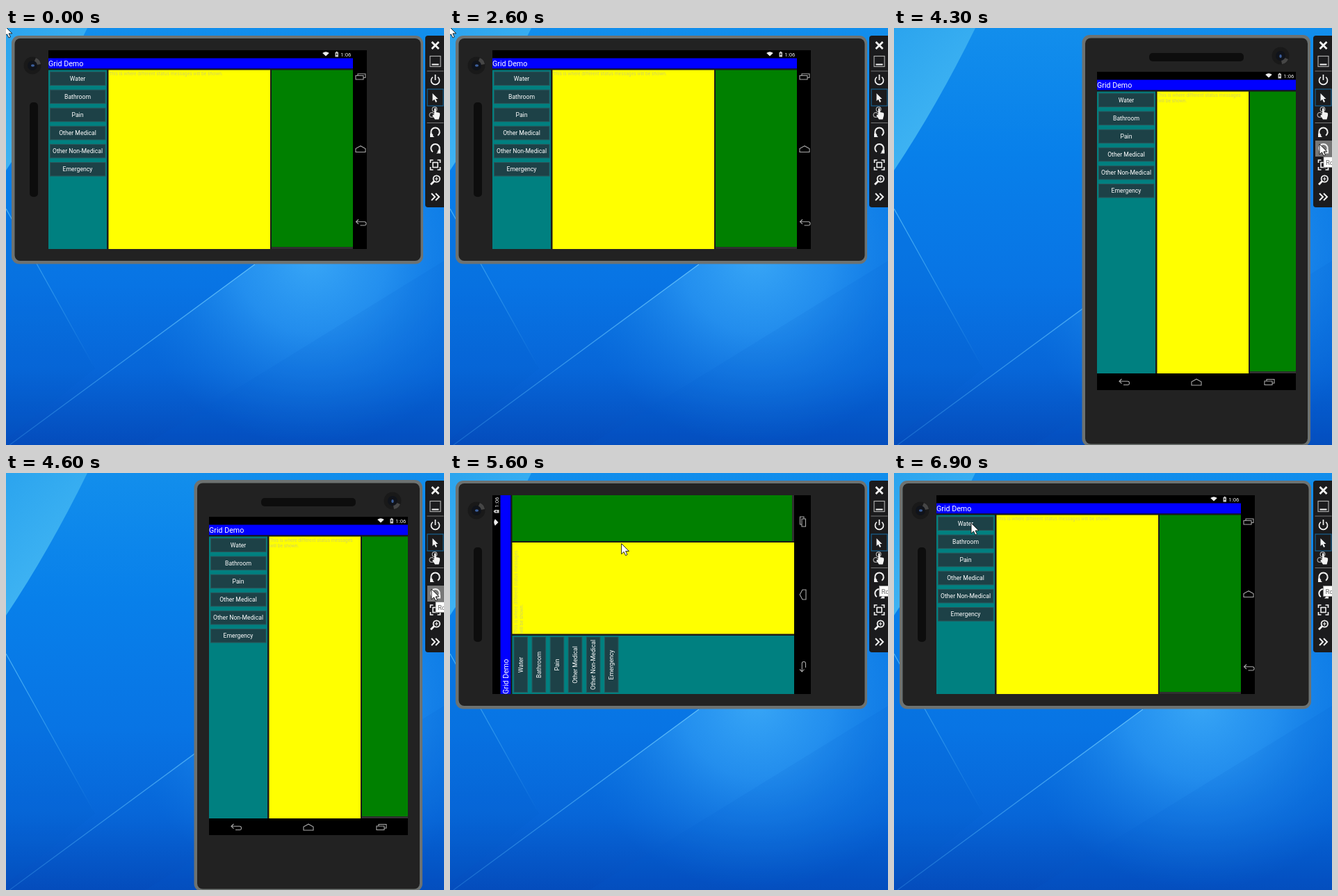
An HTML page that plays this animation: 630 px wide and 600 px high, repeating every 7000 ms.

```html
<!DOCTYPE html>
<html lang="en">
<head>
<meta charset="utf-8">
<title>Grid Demo</title>
<style>
  html, body { margin: 0; width: 100%; height: 100%; overflow: hidden; background: #0874e4; }
  svg { display: block; width: 630px; height: 600px; }
  text { font-family: Roboto, "Open Sans", sans-serif; }
</style>
</head>
<body>
<svg id="stage" viewBox="0 0 630 600" xmlns="http://www.w3.org/2000/svg">
  <defs>
    <linearGradient id="sky" x2="0" y2="1">
      <stop offset="0" stop-color="#128eec"/><stop offset=".3" stop-color="#0880ea"/>
      <stop offset=".62" stop-color="#0874e4"/><stop offset=".82" stop-color="#0766d8"/>
      <stop offset="1" stop-color="#044cbc"/>
    </linearGradient>
    <linearGradient id="wedge" x2=".6" y2="1">
      <stop offset="0" stop-color="#2ba4ee"/><stop offset="1" stop-color="#45b8f4"/>
    </linearGradient>
    <radialGradient id="glow" gradientUnits="userSpaceOnUse" cx="440" cy="330" r="270">
      <stop offset="0" stop-color="#38a6f6"/><stop offset=".4" stop-color="#2c98f2" stop-opacity=".75"/>
      <stop offset="1" stop-color="#1478e0" stop-opacity="0"/>
    </radialGradient>
    <linearGradient id="ray" gradientUnits="userSpaceOnUse" x1="0" y1="260" x2="128" y2="490">
      <stop offset="0" stop-color="#5cc0fa" stop-opacity=".8"/><stop offset="1" stop-color="#5cc0fa" stop-opacity="0"/>
    </linearGradient>
    <linearGradient id="edge" gradientUnits="userSpaceOnUse" x1="0" y1="600" x2="358" y2="340">
      <stop offset="0" stop-color="#4ab0f8" stop-opacity=".25"/><stop offset="1" stop-color="#6cc8fc" stop-opacity=".85"/>
    </linearGradient>
    <clipPath id="glass"><rect x="61" y="32" width="458" height="286"/></clipPath>
    <path id="arrow" d="M0 0V15L3.5 11.8 6 17 8.4 15.9 6 10.9H10.8Z" fill="#fff" stroke="#111" stroke-width=".9"/>
  </defs>

  <rect width="630" height="600" fill="url(#sky)"/>
  <path d="M0 0H117Q62 112 0 205Z" fill="url(#wedge)"/>
  <path d="M0 260L128 490 0 592Z" fill="#0458c4" opacity=".12"/>
  <path d="M0 260L128 490" stroke="url(#ray)" stroke-width="1.3"/>
  <path d="M5 600L358 340 630 139V600Z" fill="url(#glow)"/>
  <path d="M330 520L630 335V600H200Z" fill="#0458c8" opacity=".12"/>
  <path d="M5 600L358 340" stroke="url(#edge)" stroke-width="1.3"/>

  <g id="device">
    <rect x="8" y="11" width="592" height="328.5" rx="11" fill="#6d7271"/>
    <rect x="12.5" y="15" width="584" height="320" rx="8" fill="#222"/>
    <rect x="34" y="107" width="12" height="136" rx="5" fill="#0d0d0d"/>
    <circle cx="38" cy="54" r="12.5" fill="#191919"/>
    <path d="M38 54L43 43A12 12 0 0 1 50 52Z" fill="#555" opacity=".75"/>
    <circle cx="38" cy="54" r="7" fill="#10131a"/>
    <ellipse cx="38.5" cy="54" rx="2.6" ry="1.7" fill="#3c5f9c"/>
    <rect x="61" y="32" width="458" height="286"/>
    <g clip-path="url(#glass)"><g id="screen"></g></g>
  </g>

  <path d="M630 11H607Q603 11 603 15V254Q603 258 607 258H630Z" fill="#1b1b1d"/>
  <rect id="hover" x="606" width="24" height="23"/>
  <g id="tools" fill="none" stroke="#f2f2f2" stroke-width="2"></g>
  <g id="tip">
    <rect width="40" height="15" fill="#fff" stroke="#8a8a8a" stroke-width=".8"/>
    <text x="3" y="11" font-size="9.5" fill="#666">Rotate</text>
  </g>
  <use id="corner" href="#arrow" transform="translate(-2 -3)"/>
  <use id="pointer" href="#arrow"/>
</svg>

<script>
const $ = id => document.getElementById(id);
const LOOP = 7000, STEP = 100;
const LABELS = ['Water', 'Bathroom', 'Pain', 'Other Medical', 'Other Non-Medical', 'Emergency'];

const rect = (x, y, w, h, fill, more = '') =>
  `<rect x="${x}" y="${y}" width="${w}" height="${h}" fill="${fill}" ${more}/>`;
const text = (x, y, size, str, more = 'fill="#fff"') =>
  `<text x="${x}" y="${y}" font-size="${size}" ${more}>${str}</text>`;
const at = (x, y, body) => `<g transform="translate(${x} ${y})">${body}</g>`;

const NAV = {
  back: '<path d="M-3.5 -4.5L-7 -1.2 -3.5 2M-7 -1.2H5Q7.5 -1.2 7.5 1.3 7.5 4 5 4H-1"/>',
  home: '<path d="M-7 4.5V-.5L0 -4.3 7 -.5V4.5Z"/>',
  recent: '<path d="M-7 -1.5H4V4H-7ZM-4 -1.5V-4H7V1.5H4"/>'
};

// One app layout: w x h is the whole screen, cw x ch the part beside the navigation bar.
function layout(w, h, cw, ch, lines, nav) {
  const mid = 86 + Math.round((cw - 88) * 2 / 3), top = 28.5;
  const buttons = LABELS.map((label, i) => {
    const y = 31 + i * 26.1;
    return rect(2.5, y, 79.5, 19.5, '#1d4147', 'stroke="#2b565a" stroke-width="1"') +
      text(42, y + 12.7, 8.66, label, 'fill="#fff" text-anchor="middle"');
  }).join('');
  const note = lines.map((s, i) =>
    text(87, 36.2 + i * 7.5, 6.75, s, 'fill="#c4c47c" opacity=".75"')).join('');
  const status =
    at(cw - 39, 8.5, '<path d="M0 0L-4.8 -4.6Q0 -8 4.8 -4.6Z" fill="#eee"/>') +
    rect(cw - 25.5, 3, 4.5, 6.5, '#ccc') + rect(cw - 24.3, 1.8, 2, 1.5, '#ccc') +
    rect(cw - 24.3, 4.5, 2.1, 2.5, '#444') +
    text(cw - 2.5, 8.8, 7.9, '1:06', 'fill="#e8e8e8" text-anchor="end"');
  const icons = nav.map(([name, x, y]) => at(x, y, NAV[name])).join('');
  return rect(0, 0, w, h, '#000') + status +
    rect(0, 11.5, cw, 15, '#00f') + text(0, 23, 10.7, 'Grid Demo') +
    rect(0, 26.5, cw, ch - 26.5, '#1b1b1b') +
    rect(0, top, 84, ch - top, '#008080') + buttons +
    rect(86.5, top, mid - 86.5, ch - top, '#ff0') + note +
    rect(mid + 2, top, cw - mid - 2, ch - top - 3, '#008000') +
    rect(mid + 2, ch - 2.5, cw - mid - 2, 2, '#383838') +
    `<g fill="none" stroke="#aaa" stroke-width="1.1">${icons}</g>`;
}

const FIRST = 'This is where different status messages', REST = 'will be shown.';
const wide = { w: 458, h: 286, cw: 438, ch: 286, lines: [FIRST + ' ' + REST],
  nav: [['recent', 449, 38], ['home', 449, 142], ['back', 449.5, 248]] };
const tall = { w: 286, h: 458, cw: 286, ch: 434, lines: [FIRST, REST],
  nav: [['back', 39, 446.5], ['home', 143, 446.5], ['recent', 248, 446.5]] };
for (const v of [wide, tall]) {
  v.el = document.createElementNS('http://www.w3.org/2000/svg', 'g');
  v.el.innerHTML = layout(v.w, v.h, v.cw, v.ch, v.lines, v.nav);
  $('screen').append(v.el);
}

const TURN = '<path d="M-3.6 5.2A6.2 6.2 0 1 1 3.6 5.2"/>' +
  '<path d="M-7.5 1.5V7.5H-1.5Z" fill="#f2f2f2" stroke="none"/>';
const TOOLS = [
  [25, '<path d="M-5 -5L5 5M5 -5L-5 5" stroke-width="2.8"/>'],
  [48, '<rect x="-7.5" y="-7.5" width="15" height="15" stroke="#aaa" stroke-width="1.2"/><path d="M-5 4.5H5"/>'],
  [62, '<path d="M-12 0H12" stroke="#777" stroke-width="1"/>'],
  [75, '<path d="M-3.6 -4.4A6 6 0 1 0 3.6 -4.4M0 -8V0" stroke-width="1.7"/>'],
  [100, '<rect x="-11.5" y="-12" width="23" height="24" stroke="#17608f" stroke-width="1.2"/>' +
    '<path d="M-4 -6V5L-1.4 2.8 .6 7 2.5 6 .6 2H4Z" fill="#f2f2f2" stroke="none"/>'],
  [122, '<circle cx="-5" cy="3" r="3.4" stroke="#aaa" stroke-width="1.2"/><circle cx="-1" cy="-5" r="3.4" stroke="#aaa" stroke-width="1.2"/>' +
    '<path d="M-1.5 -6Q0 -7.5 1 -6V-1L6 0Q7 1 6.5 4L5 9.5H-.5L-4 4Q-4 2 -1.5 3.5Z" fill="#f2f2f2" stroke="none"/>'],
  [136.5, '<path d="M-12 0H12" stroke="#777" stroke-width="1"/>'],
  [149.5, TURN],
  [173, `<g transform="scale(-1 1)">${TURN}</g>`],
  [197, '<path d="M-7 -3V-7H-3M3 -7H7V-3M7 3V7H3M-3 7H-7V3" stroke-width="1.7"/><rect x="-3.5" y="-3.5" width="7" height="7" stroke-width="1.6"/>'],
  [219, '<circle cx="1.8" cy="-2" r="4.7" stroke-width="1.8"/><path d="M-1.8 1.6L-6.5 6.3" stroke-width="2.8"/><path d="M-.6 -2H4.2M1.8 -4.4V.4" stroke-width="1.2"/>'],
  [243, '<path d="M-5.5 -5L-.5 0 -5.5 5M.5 -5L5.5 0 .5 5"/>']
];
$('tools').innerHTML = TOOLS.map(([y, body]) => at(617.5, y, body)).join('');

// time, x, y of the pointer tip
const PATH = [[3300, 594, 214], [3500, 614, 178], [3700, 614, 178], [3900, 612, 167], [4700, 612, 167],
  [4900, 617, 152], [5200, 617, 152], [5800, 117, 84], [6100, 111, 72], [7000, 111, 72]];
// from, to, top, colour of the lit tool button
const LIT = [[3500, 3700, 162, '#777'], [3700, 3800, 162, '#1484dc'], [3800, 4800, 162, '#777'],
  [4800, 5000, 138, '#777'], [5000, 5200, 138, '#1484dc'], [5200, 5400, 138, '#777']];
// from, to, x, y of the tooltip
const TIPS = [[4200, 4800, 618, 185.5], [5200, 7000, 617.5, 162.5]];
const TALL_FROM = 3800, WIDE_FROM = 5200;

const show = (el, on) => el.setAttribute('visibility', on ? 'visible' : 'hidden');
const move = (el, x, y) => el.setAttribute('transform', `translate(${x} ${y})`);
const during = (table, t) => table.find(([a, b]) => t >= a && t < b);

function pointerAt(t) {
  const i = PATH.findIndex(p => p[0] > t);
  if (i < 1) return null;
  const [t0, x0, y0] = PATH[i - 1], [t1, x1, y1] = PATH[i];
  const u = (t - t0) / (t1 - t0), k = u * u * (3 - 2 * u);
  return [x0 + (x1 - x0) * k, y0 + (y1 - y0) * k];
}

function drawScreen(t) {
  const upright = t >= TALL_FROM && t < WIDE_FROM;
  const begin = upright ? 3920 : 5636;
  const p = t < TALL_FROM ? 1 : Math.min(1, Math.max(0, (t - begin) / 400));
  const left = upright && t >= 4300 ? 0 : (1 - p) ** 5;
  const angle = (upright ? 90 : -90) * left - (upright ? 90 : 0);
  const [now, old] = upright ? [tall, wide] : [wide, tall];
  const fade = Math.max(0, 1 - p / .3);
  $('device').setAttribute('transform', upright ? 'translate(610 2) rotate(90)' : '');
  for (const v of [wide, tall])
    v.el.setAttribute('transform', `translate(290 175) rotate(${angle}) translate(${-v.w / 2} ${-v.h / 2})`);
  $('screen').append(old.el);
  show(now.el, fade < 1);
  show(old.el, fade > 0);
  now.el.setAttribute('opacity', 1);
  old.el.setAttribute('opacity', fade);
}

function draw(t) {
  drawScreen(t);
  show($('corner'), t < TALL_FROM);
  const pos = pointerAt(t);
  show($('pointer'), pos);
  if (pos) move($('pointer'), ...pos);
  const lit = during(LIT, t);
  show($('hover'), lit);
  if (lit) {
    $('hover').setAttribute('y', lit[2]);
    $('hover').setAttribute('fill', lit[3]);
  }
  const tip = during(TIPS, t);
  show($('tip'), tip);
  if (tip) move($('tip'), tip[2], tip[3]);
}

const start = performance.now();
let last = -1;
function tick() {
  const t = Math.floor((performance.now() - start) % LOOP / STEP) * STEP;
  if (t !== last) draw(last = t);
  requestAnimationFrame(tick);
}
tick();
</script>
</body>
</html>
```
